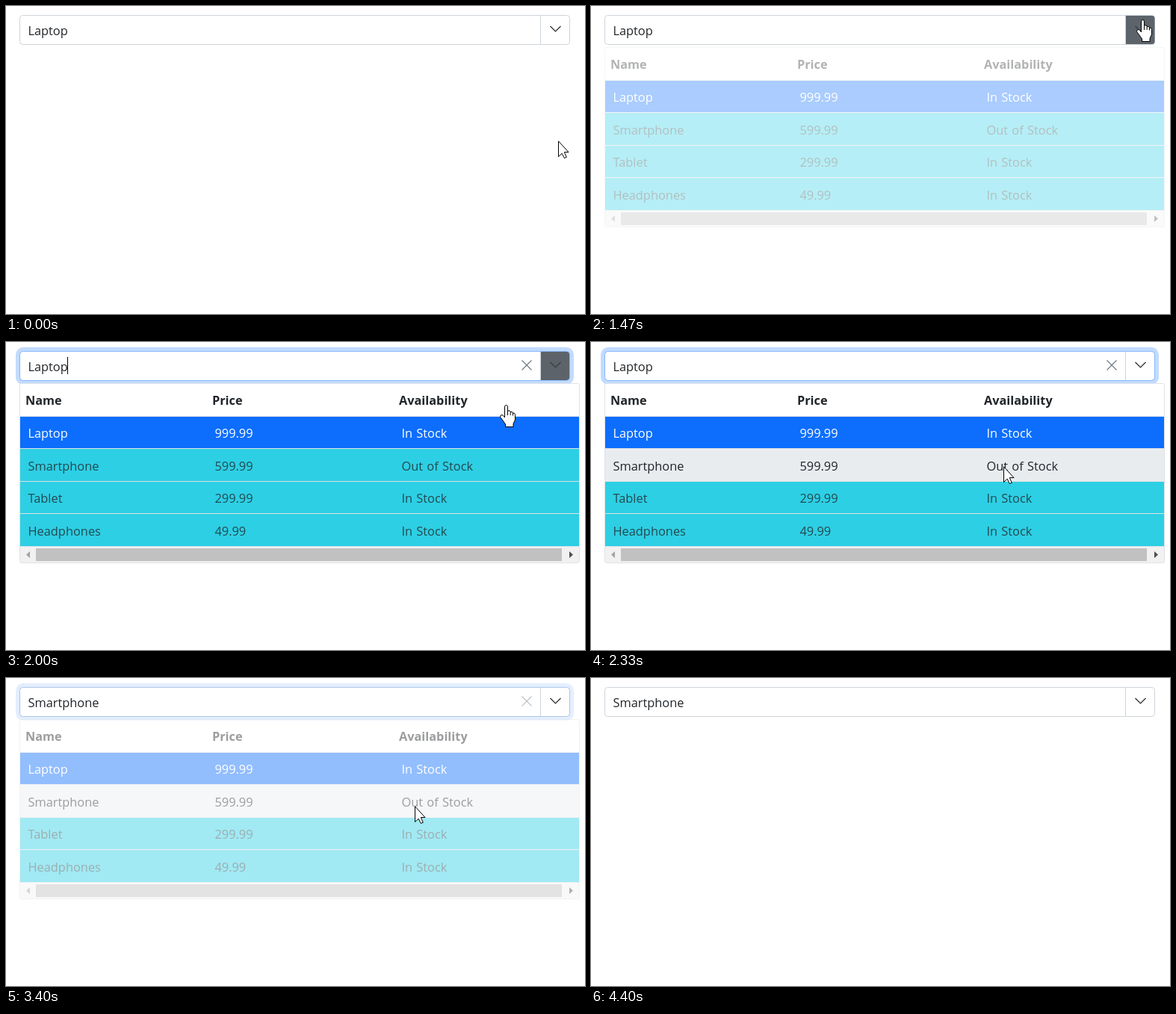
An HTML page for the animation above (4870 ms loop, 775x412 px).

```html
<!DOCTYPE html>
<html lang="en">
<head>
<meta charset="utf-8">
<title>Product dropdown</title>
<style>
html, body { margin: 0; width: 100%; height: 100%; overflow: hidden; background: #fff; }
svg { display: block; }
text { font: 400 16.4px "Open Sans", "Noto Sans", sans-serif; word-spacing: 1px; fill: #212529; }
.head text { font-weight: 700; font-size: 16.3px; }
.picked text { fill: #fff; }
.tinted text { fill: #244950; }
.anim { animation: 4870ms step-end infinite; }

#fill { animation-name: fill; }
#focus { animation-name: focus; }
#popup { animation-name: popup; }
#before { animation-name: before; }
#after { animation-name: after; }
#caret { animation-name: caret; }
#row-hover { animation-name: row-hover; }
#pointer { animation-name: pointer; }
#arrow { animation-name: arrow; }
#hand { animation-name: hand; }

@keyframes fill {
  0%, 45.17% { opacity: 0; }
  24.64% { opacity: .45; }
  26.07% { opacity: 1; }
  42.5% { opacity: .6; }
  43.73% { opacity: .2; }
}
@keyframes focus {
  0%, 71.25% { opacity: 0; }
  32.85% { opacity: 1; }
  69.81% { opacity: .45; }
}
@keyframes popup {
  0%, 71.25% { opacity: 0; }
  30.18% { opacity: .35; }
  31.41% { opacity: .8; }
  32.85% { opacity: 1; }
  69.81% { opacity: .45; }
}
@keyframes before { 0% { opacity: 1; } 69.81%, 100% { opacity: 0; } }
@keyframes after { 0% { opacity: 0; } 69.81%, 100% { opacity: 1; } }
@keyframes caret {
  0%, 43.73%, 65.7% { opacity: 0; }
  32.85%, 54.82% { opacity: 1; }
}
@keyframes row-hover { 0% { opacity: 0; } 45.17%, 100% { opacity: 1; } }
@keyframes arrow { 0%, 42.5% { opacity: 1; } 24.64% { opacity: 0; } }
@keyframes hand { 0%, 42.5% { opacity: 0; } 24.64% { opacity: 1; } }
@keyframes pointer {
  0% { transform: translate(739px, 180px); }
  1.43% { transform: translate(738px, 172px); }
  2.66% { transform: translate(735px, 155px); }
  4.1% { transform: translate(731px, 132px); }
  5.54% { transform: translate(724px, 106px); }
  6.77% { transform: translate(717px, 82px); }
  8.21% { transform: translate(712px, 67px); }
  9.65% { transform: translate(710px, 60px); }
  16.42% { transform: translate(703px, 63px); }
  17.86% { transform: translate(690px, 70px); }
  19.09% { transform: translate(676px, 79px); }
  20.53% { transform: translate(665px, 87px); }
  21.97% { transform: translate(660px, 83px); }
  23.2% { transform: translate(679px, 62px); }
  24.64% { transform: translate(718px, 32px); }
  26.07% { transform: translate(730px, 18px); }
  41.06% { transform: translate(661px, 84px); }
  42.5% { transform: translate(626px, 117px); }
  43.73% { transform: translate(592px, 139px); }
  45.17% { transform: translate(571px, 153px); }
  46.61% { transform: translate(559px, 161px); }
  47.84% { transform: translate(552px, 166px); }
  49.28% { transform: translate(549px, 169px); }
  50.71% { transform: translate(548px, 170px); }
  53.38% { transform: translate(547px, 171px); }
  76.59% { transform: translate(525px, 180px); }
  78.02% { transform: translate(460px, 208px); }
  79.46% { transform: translate(370px, 252px); }
  80.69% { transform: translate(280px, 299px); }
  82.13% { transform: translate(205px, 337px); }
  83.57% { transform: translate(148px, 362px); }
  84.8% { transform: translate(106px, 378px); }
  86.24% { transform: translate(81px, 386px); }
  87.67% { transform: translate(70px, 395px); }
  88.91% { transform: translate(65px, 405px); }
  90.34%, 100% { transform: translate(65px, 450px); }
}
</style>
</head>
<body>
<svg width="775" height="412" viewBox="0 0 775 412">
  <!-- input with button -->
  <rect x="18.5" y="12.5" width="736" height="39" rx="4" fill="#fff" stroke="#ced4da"/>
  <path d="M728.5 27l7 7 7-7" fill="none" stroke="#212529" stroke-width="1.1"/>
  <g id="fill" class="anim">
    <path d="M716 13h35a3.5 3.5 0 0 1 3.5 3.5v31a3.5 3.5 0 0 1-3.5 3.5h-35z" fill="#5c636a"/>
    <path d="M728.5 27l7 7 7-7" fill="none" stroke="#373d43" stroke-width="1.1"/>
  </g>
  <path d="M715.5 13v38" stroke="#ced4da"/>
  <g id="focus" class="anim" fill="none">
    <rect x="15.5" y="9.5" width="742" height="45" rx="7.5" stroke="#c2dbfe" stroke-width="5"/>
    <rect x="18.5" y="12.5" width="736" height="39" rx="4" stroke="#86b7fe"/>
    <path d="M690.5 24.5l13 13M703.5 24.5l-13 13" stroke="#6c757d" stroke-width="1.1"/>
  </g>
  <text id="before" class="anim" x="29.4" y="39">Laptop</text>
  <text id="after" class="anim" x="29.4" y="39">Smartphone</text>
  <rect id="caret" class="anim" x="82" y="20" width="1" height="23"/>

  <!-- list -->
  <g id="popup" class="anim">
    <rect x="18.5" y="55.5" width="749" height="240" rx="2" fill="#fff" stroke="#dee2e6"/>
    <path d="M19 100h748v42H19z" fill="#0d6efd"/>
    <path d="M19 143h748v130H19z" fill="#2dcfe4"/>
    <g class="tinted">
      <text x="29.4" y="172">Smartphone</text><text x="279.4" y="172">599.99</text><text x="529.4" y="172">Out of Stock</text>
      <text x="29.4" y="215">Tablet</text><text x="279.4" y="215">299.99</text><text x="529.4" y="215">In Stock</text>
      <text x="29.4" y="259">Headphones</text><text x="279.4" y="259">49.99</text><text x="529.4" y="259">In Stock</text>
    </g>
    <g id="row-hover" class="anim">
      <path d="M19 143h748v43H19z" fill="#e9ecef"/>
      <text x="29.4" y="172">Smartphone</text><text x="279.4" y="172">599.99</text><text x="529.4" y="172">Out of Stock</text>
    </g>
    <path d="M19 99.5h748M19 142.5h748M19 186.5h748M19 229.5h748M19 273.5h748" stroke="#dee2e6"/>
    <g class="head">
      <text x="26" y="84">Name</text><text x="276" y="84">Price</text><text x="526" y="84">Availability</text>
    </g>
    <g class="picked">
      <text x="29.4" y="128">Laptop</text><text x="279.4" y="128">999.99</text><text x="529.4" y="128">In Stock</text>
    </g>
    <path d="M19 274h748v21H19z" fill="#f1f1f1"/>
    <path d="M40 276h704v17H40z" fill="#c1c1c1"/>
    <path d="M32 280v9l-5-4.5z" fill="#a3a3a3"/>
    <path d="M754 280v9l5-4.5z" fill="#505050"/>
  </g>

  <g id="pointer" class="anim" fill="#fff" stroke="#000">
    <path id="arrow" class="anim" d="M.5 .8V21.5L5.2 17.2 8.3 23.5 11.3 22.3 8.3 15.5H14z"/>
    <g id="hand" class="anim" stroke-linejoin="round">
      <path d="M6.5 17V3Q6.5 .5 8.5 .5T10.5 3V8Q14 7 14.2 9.5 17 8.5 17.5 11 20.5 10.5 20.5 13.5V20L18 25.5V29.5H7.5V26L4 21 .7 16.5Q0 13.5 3 13.5 5 14 6.5 17z"/>
      <path d="M10.5 8v6M14.2 9.5V14M17.5 11v3.5" fill="none"/>
    </g>
  </g>
</svg>
</body>
</html>
```
